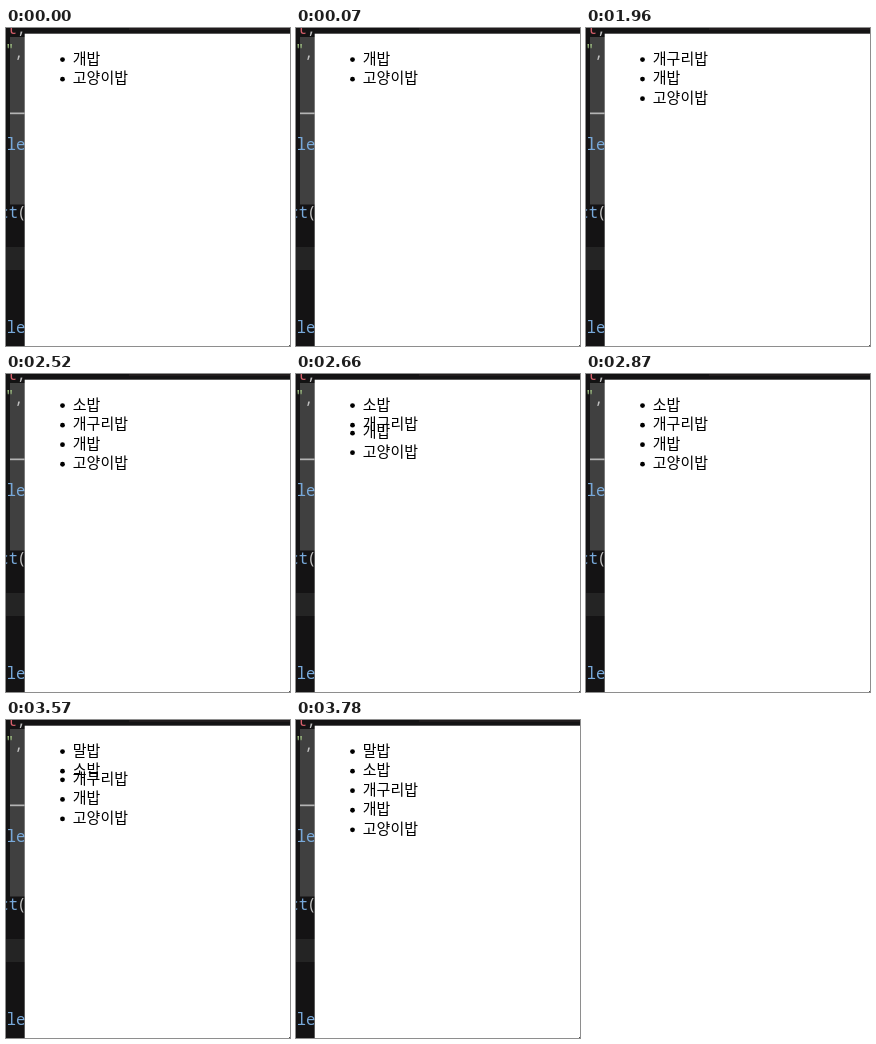
An HTML page with a canvas that plays this animation: 284 by 318 pixels, repeating every 4.97 s.

```html
<!DOCTYPE html>
<html lang="ko">
<head>
<meta charset="utf-8">
<title>List insertion</title>
<style>
  html, body { margin: 0; width: 100%; height: 100%; overflow: hidden; background: #141314; }
  canvas { display: block; }
</style>
</head>
<body>
<canvas id="stage" width="284" height="318"></canvas>
<script>
const ctx = document.getElementById('stage').getContext('2d');
const LOOP = 4970, TICK = 70, SLIDE = 300;
const ROW = 19.55, BASELINE = 35.7;
const BLUE = '#78a9da', GREY = '#c0c0c0';

// Each insertion puts a label on top; older rows slide down from `slide` on.
const INITIAL = ['개밥', '고양이밥'];
const INSERTS = [
  { at: 1680, slide: 1680, label: '개구리밥' },
  { at: 2520, slide: 2585, label: '소밥' },
  { at: 3430, slide: 3490, label: '말밥' }
];

// cubic-bezier(.25, .1, .25, 1)
function ease(x) {
  if (x <= 0) return 0;
  if (x >= 1) return 1;
  const curve = (a, b, s) => 3 * a * s * (1 - s) ** 2 + 3 * b * s * s * (1 - s) + s ** 3;
  let lo = 0, hi = 1;
  for (let i = 0; i < 24; i++) {
    const mid = (lo + hi) / 2;
    if (curve(0.25, 0.25, mid) < x) lo = mid; else hi = mid;
  }
  return curve(0.1, 1, lo);
}

function rect(color, x, y, w, h) {
  ctx.fillStyle = color;
  ctx.fillRect(x, y, w, h);
}

function code(text, x, y, color) {
  ctx.font = '500 15.5px "Noto Sans Mono", monospace';
  ctx.fillStyle = color;
  ctx.fillText(text, x, y);
}

function drawEditor() {
  rect('#141314', 0, 0, 284, 318);
  rect('#211c1d', 123, 0, 161, 2);
  rect('#404040', 4, 9, 15, 167.5);
  rect('#242424', 0, 219, 19, 23);
  rect('#b4b4b4', 4, 84.5, 14.5, 1.7);
  code('t', 1.5, 6, '#d5606b');
  code(',', 10.5, 6, GREY);
  code('"', -1, 28, '#a6c987');
  code(',', 8, 30, GREY);
  code('ele', -8.5, 121.5, BLUE);
  code('ct', -6.5, 190, BLUE);
  code('(', 11, 190, GREY);
  code('ele', -8.5, 305, BLUE);
}

function drawPage() {
  rect('#fff', 18.7, 5.7, 266, 313);
  rect('#555', 283, 317, 1, 1);
}

function drawItem(label, row) {
  const y = BASELINE + row * ROW;
  ctx.fillStyle = '#000';
  ctx.beginPath();
  ctx.arc(56.5, y - 4.1, 2.4, 0, Math.PI * 2);
  ctx.fill();
  ctx.font = '500 15px "Noto Sans CJK KR", "Noto Sans CJK", sans-serif';
  ctx.fillText(label, 66.8, y);
}

function drawList(t) {
  const done = INSERTS.filter(e => t >= e.at);
  const labels = [...done.map(e => e.label).reverse(), ...INITIAL];
  const last = done[done.length - 1];
  const lag = last && t >= last.slide ? 1 - ease((t - last.slide) / SLIDE) : 0;
  // The new row and the one inserted just before it appear in place.
  const fixed = Math.min(done.length, 2);
  labels.forEach((label, i) => drawItem(label, i < fixed ? i : i - lag));
}

let start = null;
function frame() {
  const now = performance.now();
  if (start === null) start = now;
  const t = Math.floor(((now - start) % LOOP) / TICK) * TICK;
  drawEditor();
  drawPage();
  drawList(t);
  requestAnimationFrame(frame);
}
frame();
</script>
</body>
</html>
```
